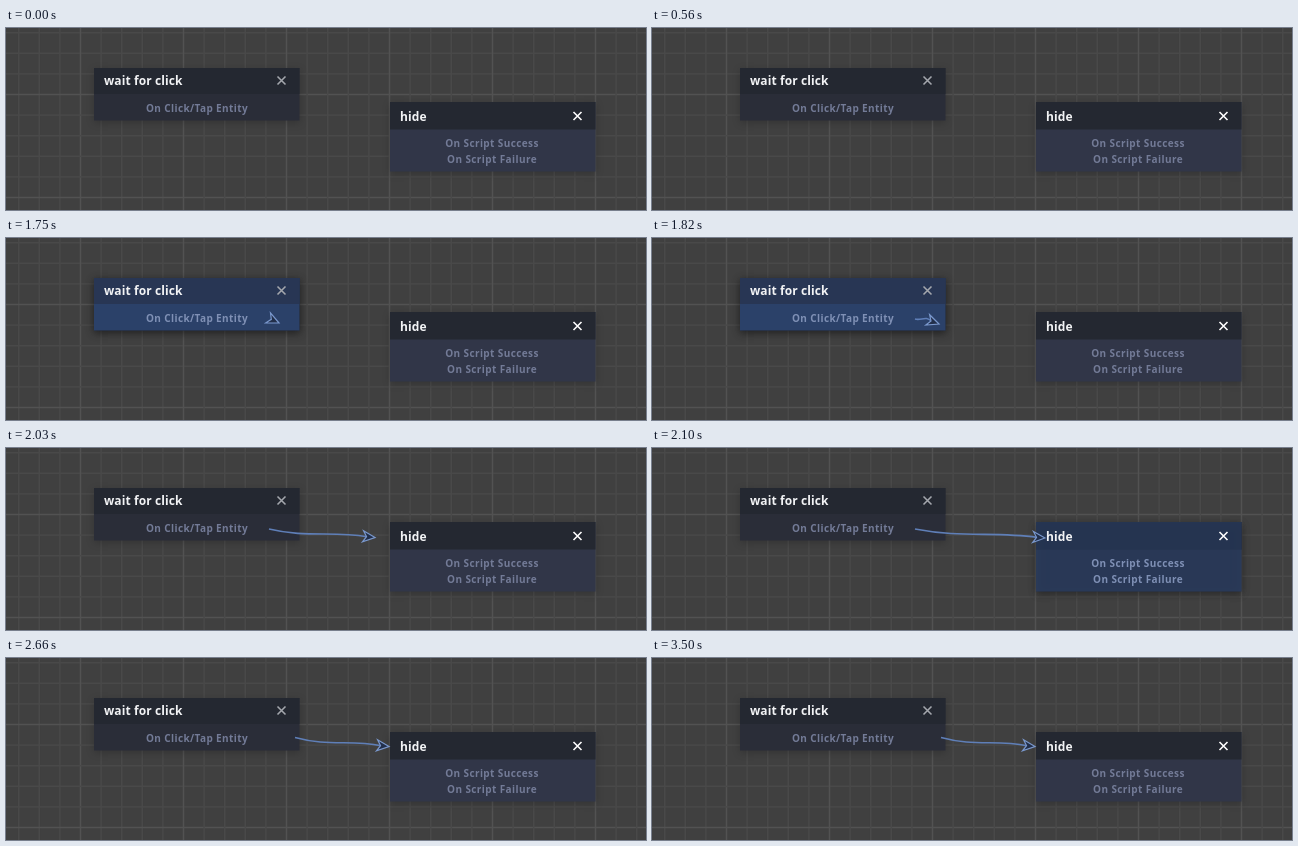
An HTML page with a canvas for the animation above (3640 ms loop, 640 by 182 pixels).

```html
<!DOCTYPE html>
<html lang="en">
<head>
<meta charset="utf-8">
<style>
  html, body { margin: 0; width: 100%; height: 100%; overflow: hidden; background: #404040; }
  canvas { display: block; }
</style>
</head>
<body>
<canvas id="stage" width="640" height="182"></canvas>
<script>
const LOOP = 3640, STEP = 70;
const ctx = document.getElementById('stage').getContext('2d');
const FONT = '"Noto Sans", "Open Sans", sans-serif';
const GRID = { minor: 20.6, x: 74.5, y: 66.5 };

const waitNode = {
  x: 88, y: 40, w: 205.5, h: 52.5, header: 26, titleY: 52.5, title: 'wait for click', close: '#a4a7ad',
  rows: [['On Click/Tap Entity', 191, 80]],
  idle: ['#242831', '#2a2d38'], lit: ['#283654', '#2b4169']
};
const hideNode = {
  x: 384, y: 74, w: 205.5, h: 69.5, header: 27.5, titleY: 88, title: 'hide', close: '#ffffff',
  rows: [['On Script Success', 486, 115], ['On Script Failure', 486, 131]],
  idle: ['#242831', '#313648'], lit: ['#253452', '#2a4169']
};

// [time, tip x, tip y, angle] while the link is being dragged
const drag = [
  [1750, 273, 85, 0.44], [1820, 287, 86, 0.35], [1890, 312, 87, 0.2],
  [2030, 369, 89.5, 0.1], [2100, 393, 90, 0.08], [2170, 408, 90, 0.05],
  [2380, 408, 90, 0.05], [2450, 401, 88, 0.05]
];

function sample(keys, t) {
  const i = keys.findIndex(k => k[0] > t);
  if (i < 0) return keys.at(-1).slice(1);
  const [a, b] = [keys[i - 1], keys[i]];
  const f = (t - a[0]) / (b[0] - a[0]);
  return a.slice(1).map((v, j) => v + (b[j + 1] - v) * f);
}

function drawGrid() {
  ctx.fillStyle = '#404040';
  ctx.fillRect(0, 0, 640, 182);
  for (let i = -4; i < 29; i++) {
    ctx.fillStyle = i % 5 ? '#494949' : '#525252';
    ctx.fillRect(GRID.x + i * GRID.minor - 0.75, 0, 1.5, 182);
    ctx.fillRect(0, GRID.y + i * GRID.minor - 0.75, 640, 1.5);
  }
}

function text(str, x, y, size, weight, color, align, spacing) {
  ctx.font = `${weight} ${size}px ${FONT}`;
  ctx.letterSpacing = spacing + 'px';
  ctx.fillStyle = color;
  ctx.textAlign = align;
  ctx.fillText(str, x, y);
}

function panel({ x, y, w, h, header }, colors, shadow) {
  ctx.save();
  ctx.shadowColor = `rgba(0,0,0,${shadow})`;
  ctx.shadowBlur = 8;
  ctx.shadowOffsetY = 2;
  ctx.fillStyle = colors[1];
  ctx.fillRect(x, y, w, h);
  ctx.restore();
  ctx.fillStyle = colors[0];
  ctx.fillRect(x, y, w, header);
}

function drawNode(node, glow) {
  panel(node, node.idle, 0.2);
  if (glow > 0) {
    ctx.globalAlpha = glow;
    panel(node, node.lit, 0.35);
    ctx.globalAlpha = 1;
  }
  const { x, w, titleY } = node;
  text(node.title, x + 10, titleY + 4.5, 12, 600, '#f2f3f5', 'left', 0.1);
  for (const [label, cx, cy] of node.rows)
    text(label, cx, cy + 3.5, 10, 600, glow > 0.5 ? '#7f90b5' : '#737b97', 'center', 0.4);

  const cx = x + w - 18, cy = titleY;
  ctx.strokeStyle = node.close;
  ctx.lineWidth = 1.6;
  ctx.beginPath();
  ctx.moveTo(cx - 4, cy - 4); ctx.lineTo(cx + 4, cy + 4);
  ctx.moveTo(cx + 4, cy - 4); ctx.lineTo(cx - 4, cy + 4);
  ctx.stroke();
}

function drawLink(x0, y0, x, y, angle) {
  const bx = x - 8 * Math.cos(angle), by = y - 8 * Math.sin(angle);
  const dx = bx - x0;
  ctx.strokeStyle = '#5f7fb8';
  ctx.lineWidth = 1.6;
  if (dx > 4) {
    ctx.beginPath();
    ctx.moveTo(x0, y0);
    ctx.bezierCurveTo(x0 + dx * 0.38, y0 + Math.min(9, dx * 0.12), x0 + dx * 0.65, by - 6, bx, by);
    ctx.stroke();
  }
  ctx.save();
  ctx.translate(x, y);
  ctx.rotate(angle);
  ctx.beginPath();
  ctx.moveTo(0, 0);
  ctx.lineTo(-12, -5.5);
  ctx.lineTo(-8.5, 0);
  ctx.lineTo(-12, 5.5);
  ctx.closePath();
  ctx.fillStyle = '#222f4a';
  ctx.fill();
  ctx.strokeStyle = '#7a98cd';
  ctx.lineWidth = 1.2;
  ctx.stroke();
  ctx.restore();
}

function draw(t) {
  const hover = t < 1610 || t >= 1960 ? 0 : t >= 1680 && t < 1890 ? 1 : 0.5;
  const target = t < 2100 || t >= 2660 ? 0 : t < 2170 ? 0.6 : 1;
  drawGrid();
  drawNode(waitNode, hover);
  drawNode(hideNode, target);
  if (t >= 2660) drawLink(289, 79.5, 383, 88.5, 0.1);
  else if (t >= 1750) drawLink(263, 81, ...sample(drag, t));
}

function tick(now) {
  draw(Math.floor(now % LOOP / STEP) * STEP);
  requestAnimationFrame(tick);
}
requestAnimationFrame(tick);
</script>
</body>
</html>
```
